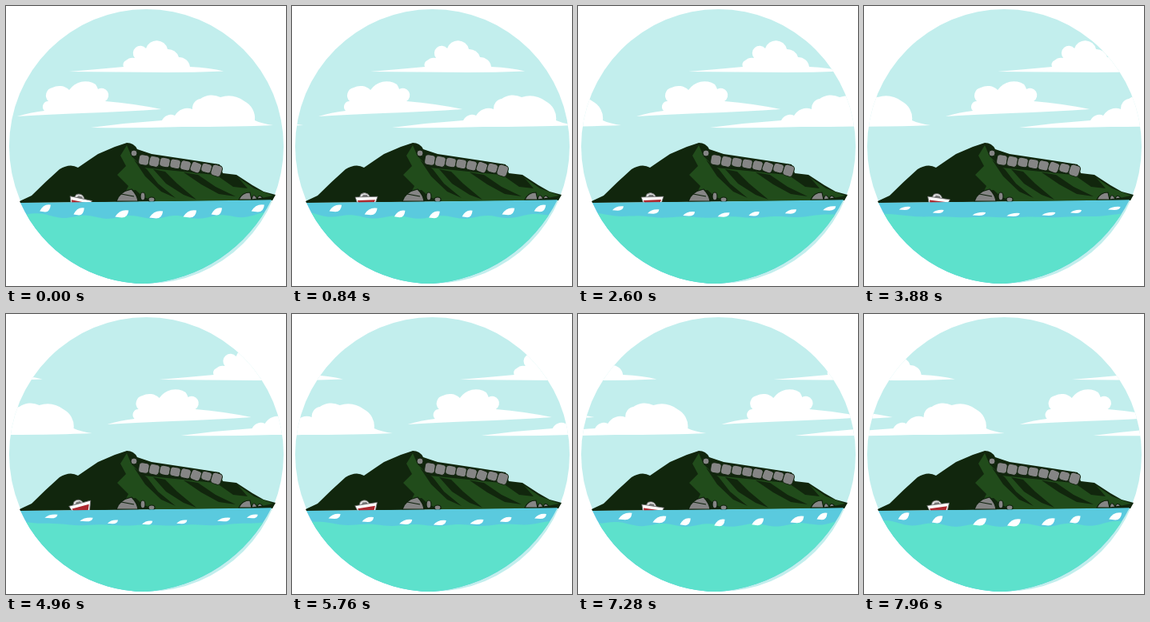
An HTML page for the animation above (8000 ms loop, 350 by 350 pixels).

```html
<!DOCTYPE html>
<html lang="en">
<head>
<meta charset="utf-8">
<style>
  html, body { margin: 0; width: 100%; height: 100%; overflow: hidden; background: #fff; }
  svg { display: block; width: 100vw; height: 100vh; }
</style>
</head>
<body>
<svg viewBox="0 0 350 350">
  <defs>
    <clipPath id="disc"><circle cx="175.5" cy="175.5" r="171.5"/></clipPath>
    <clipPath id="bowl"><path d="M18 246A171.5 171.5 0 0 0 175 347A190 190 0 0 0 332 242Z"/></clipPath>
    <g id="clouds" fill="#fff">
      <path d="M79 82Q115 79 147 76A6 6 0 0 1 150 68A12 12 0 0 1 161 65A9 9 0 0 1 175 53A14 14 0 0 1 202 54A14 14 0 0 1 216 64A14 14 0 0 1 230 76Q255 77 272 81.5Q235 83 200 83Z"/>
      <path d="M14 138Q30 133 48 131A7 7 0 0 1 53 119A10 10 0 0 1 58 102A18 18 0 0 1 79 105A24 24 0 0 1 112 98Q114 101 115 104A8 8 0 0 1 124 119Q160 122 194 129Q150 132 95 134Q45 136 14 138Z"/>
      <path d="M106 152Q150 146 195 143A12 12 0 0 1 211 137A18 18 0 0 1 233 129A12 12 0 0 1 243 116A24 24 0 0 1 268 114A34 34 0 0 1 298 119A24 24 0 0 1 311 143Q320 147 334 149Q290 151 220 151Q160 153 106 152Z"/>
    </g>
  </defs>

  <g clip-path="url(#disc)">
    <rect width="350" height="350" fill="#c2eeed"/>
    <g id="sky"><use href="#clouds"/><use href="#clouds" x="-339"/></g>
  </g>

  <path fill="#11260d" d="M17 244L32 237Q50 219 67 204Q80 196 90 202Q103 193 115 185L136 176L151 171Q160 171 164 179L182 185L235 193L267 198L271 209L288 211L308 224L322 232L337 236L333 243L18 246Z"/>
  <path fill="#214c1b" d="M151 174L143 187L150 200L139 211L153 225L150 231L162 230L172 239L188 244H300L334 237L310 228L288 213L270 212L172 202L157 188Z"/>
  <path fill="#11260d" d="M160 192L176 204L190 222L212 240L194 232L174 213ZM184 204L199 207L214 222L238 242L222 236L200 222ZM222 208L240 211L262 226L287 238L266 235L244 223ZM264 212H288L302 228L284 226Z"/>
  <g id="cliff" fill="#858585" stroke="#10220d"/>
  <g fill="#858585" stroke="#10220d" stroke-width="1.2">
    <path d="M138 244Q142 232 157 229Q164 236 165 244ZM144 235L160 238"/>
    <ellipse cx="171" cy="238" rx="3" ry="5"/>
    <ellipse cx="182" cy="242" rx="4" ry="3"/>
    <path d="M291 242Q295 233 305 233L307 242ZM307 242Q309 232 314 241ZM314 241Q316 234 321 240Z"/>
  </g>

  <g id="boat" stroke="#666" stroke-width=".8" stroke-linejoin="round">
    <path d="M84 239L86 234Q91 231 95 234L98 238Z" fill="#ddd"/>
    <path d="M87 238L89 235H94L95 238Z" fill="#777" stroke="none"/>
    <path d="M79 238L107 237L103 249H83Z" fill="#fff"/>
    <path d="M82 242L104 241L101 249H84Z" fill="#ad2930" stroke="none"/>
  </g>

  <g clip-path="url(#bowl)">
    <path d="M0 246L175 244.5L350 242V350H0Z" fill="#5acade"/>
    <path id="water" fill="#5de1cc"/>
    <path id="foam" fill="#fff"/>
  </g>
</svg>
<script>
const LOOP = 8000, STEP = 40, CLOUD_SPEED = 0.0227, ROCK_PERIOD = 3450;
const CRESTS = 7, STONES = 8;
const TAU = 2 * Math.PI;
const el = id => document.getElementById(id);
const sky = el('sky'), boat = el('boat'), water = el('water'), foam = el('foam');

// Repeatable pseudo-random number in 0..1
const noise = n => Math.abs(Math.sin(n * 12.9898 + 4.1) * 43758.5453) % 1;

function buildCliff() {
  let stones = '<circle cx="160" cy="184" r="4"/>';
  for (let i = 0; i < STONES; i++) {
    const x = 166 + i * 13, y = 186 + i * 1.8;
    const height = 11 + 3 * noise(i);
    stones += `<rect x="${x}" y="${y}" width="13" height="${height}" rx="4"
      transform="rotate(${8 + 14 * noise(i + 20)} ${x + 6} ${y + 6})"/>`;
  }
  el('cliff').innerHTML = stones;
}

function crest(x, y, w, h) {
  const r = w / 2;
  return `M${x - r} ${y + h * .4}Q${x - r * .3} ${y - h * .7} ${x + r} ${y - h * .5}` +
         `Q${x + r * .9} ${y + h * .5} ${x} ${y + h * .5}Z`;
}

function draw(t) {
  sky.setAttribute('transform', `translate(${t * CLOUD_SPEED})`);

  const rock = Math.cos(TAU * t / ROCK_PERIOD);
  boat.setAttribute('transform', `translate(0 ${1 + 2 * rock}) rotate(${14 * rock} 93 241)`);

  // The sea is rougher near the ends of the loop and calm in the middle.
  const swell = .5 + .5 * Math.cos(TAU * t / LOOP);

  let edge = 'M0 350V250';
  for (let x = 0; x <= 350; x += 5) {
    const bow = 264 - 8 * ((x - 175) / 175) ** 4;
    edge += `L${x} ${bow + (.4 + 1.6 * swell) * Math.sin(x / 9 + t / 300)}`;
  }
  water.setAttribute('d', edge + 'V350Z');

  let crests = '';
  for (let i = 0; i < CRESTS; i++) {
    const drift = Math.sin(TAU * (t / 2000 + noise(i)));
    const x = 53 + i * 43 + 6 * drift;
    const y = 253 + 8 * Math.sin(Math.PI * i / (CRESTS - 1));
    crests += crest(x, y, 15 + 2 * drift, 4 + 5 * swell);
  }
  foam.setAttribute('d', crests);
}

buildCliff();
const start = performance.now();
function tick() {
  const t = (performance.now() - start) % LOOP;
  draw(Math.floor(t / STEP) * STEP);
  requestAnimationFrame(tick);
}
tick();
</script>
</body>
</html>
```
